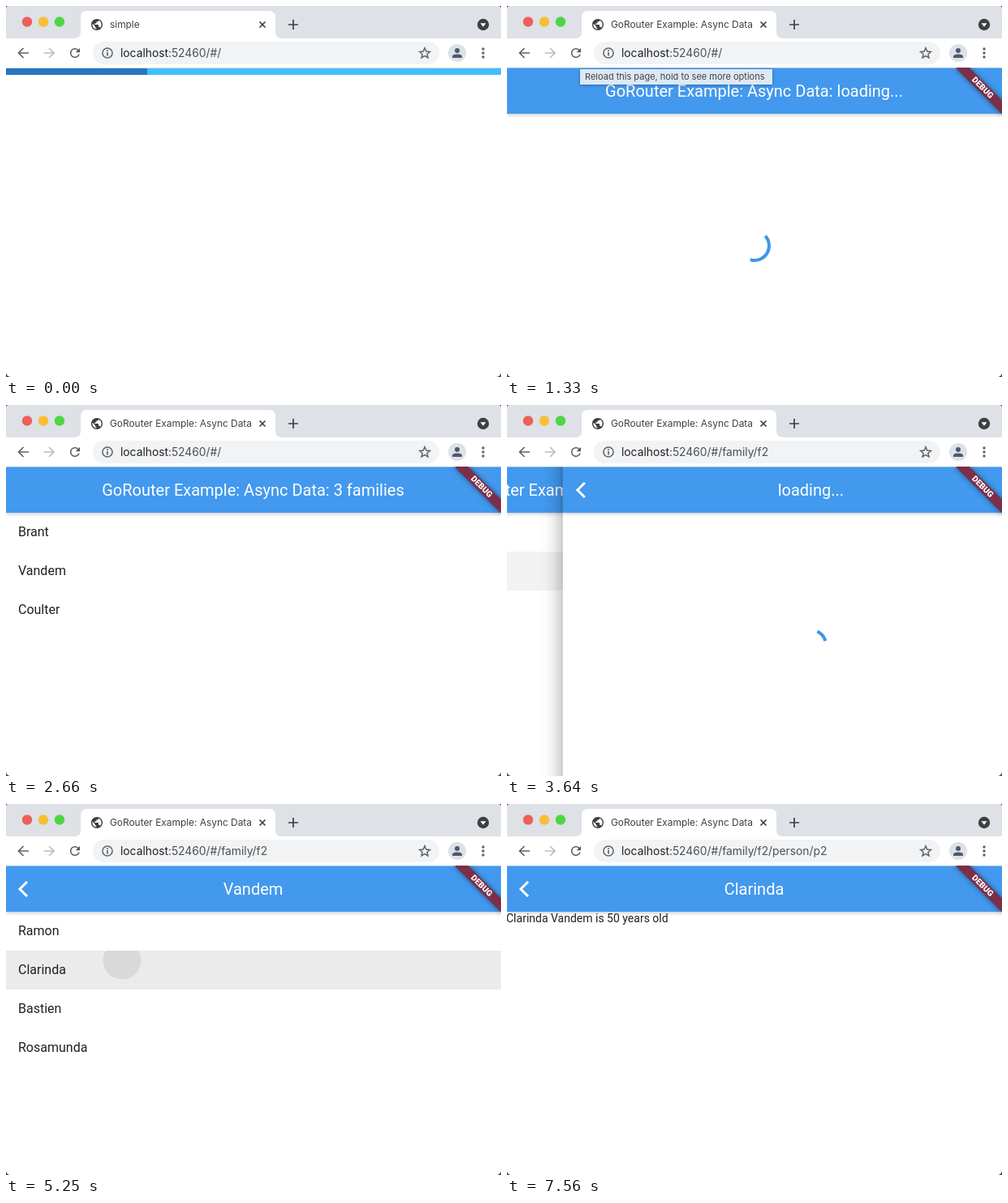
Animation of 610x458 px, one loop 8 s. Source, as an HTML page:

```html
<!DOCTYPE html>
<html lang="en">
<head>
<meta charset="utf-8">
<title>Async data</title>
<style>
  html, body { margin: 0; width: 100%; height: 100%; overflow: hidden; background: #444; }
  #window { position: relative; width: 610px; height: 458px; overflow: hidden; background: #fff; border-radius: 4px 4px 6px 6px; }
  #chrome { position: absolute; left: 0; top: 0; font-family: Inter, "Open Sans", sans-serif; }
  #app { position: absolute; left: 0; top: 76px; width: 610px; height: 382px; overflow: hidden; font-family: Roboto, sans-serif; }
  #loader { position: absolute; left: 0; top: 1px; width: 610px; height: 8px; background: #42bffa; }
  #bar { position: absolute; height: 8px; background: #2676be; }
  .page { position: absolute; left: -1px; top: 0; width: 611px; height: 382px; background: #fff; }
  .edge { position: absolute; left: -30px; top: 0; width: 30px; height: 382px;
    background: linear-gradient(90deg, rgba(0,0,0,0), rgba(0,0,0,.016) 30%, rgba(0,0,0,.07) 60%, rgba(0,0,0,.22)); }
  .header { position: relative; z-index: 1; height: 56px; border-top: 1px solid rgba(66,153,238,.5);
    background: #4299ee padding-box; color: #fff; text-align: center;
    font-size: 20px; line-height: 56px; white-space: nowrap; box-shadow: 0 1px 5px rgba(0,0,0,.26); }
  .back { position: absolute; left: 0; top: 0; }
  .row { position: relative; height: 48px; padding-left: 16px; overflow: hidden; font-size: 16px; line-height: 48px; color: #212121; }
  .row span { position: relative; }
  .ripple { position: absolute; left: 144px; top: 12px; border-radius: 50%; background: #000; transform: translate(-50%, -50%); }
  .note { font-size: 14px; line-height: 16px; color: #212121; }
  .spinner { position: absolute; left: 280.5px; top: 194.5px; }
  #banner { position: absolute; left: 546px; top: 19px; width: 80px; height: 12px; transform: rotate(45deg);
    background: #7c2f48; box-shadow: 0 0 6px rgba(0,0,0,.5); color: #fff; font: 900 10.2px/12px Roboto, sans-serif; text-align: center; }
  #tooltip { position: absolute; left: 90px; top: 78px; width: 237px; height: 19px; box-sizing: border-box; padding-left: 6px;
    background: rgba(246,246,246,.86); box-shadow: 0 0 1px rgba(0,0,0,.45), 0 1px 4px rgba(0,0,0,.25);
    font: 11px/18px Inter, "Open Sans", sans-serif; color: #3f4246; white-space: nowrap; }
</style>
</head>
<body>
<div id="window">
  <svg id="chrome" width="610" height="77" fill="none" stroke-width="1.7">
    <path d="M0 0H610V40H0Z" fill="#dee1e6"/>
    <path d="M84 40Q92 40 92 32V14Q92 6 100 6H324Q332 6 332 14V32Q332 40 340 40Z" fill="#fff"/>
    <path d="M0 76.5H610" stroke="#dadce0" stroke-width="1"/>
    <circle cx="26" cy="19.5" r="6.2" fill="#ed5f5c"/>
    <circle cx="46" cy="19.5" r="6.2" fill="#f6bf35"/>
    <circle cx="66" cy="19.5" r="6.2" fill="#4fd544"/>
    <path transform="translate(103.6 14.6) scale(.7)" fill="#3c4043" d="M12 2C6.48 2 2 6.48 2 12s4.48 10 10 10 10-4.48 10-10S17.52 2 12 2zm-1 17.93c-3.95-.49-7-3.85-7-7.93 0-.62.08-1.21.21-1.79L9 15v1c0 1.1.9 2 2 2zm6.9-2.54c-.26-.81-1-1.39-1.9-1.39h-1v-3c0-.55-.45-1-1-1H8v-2h2c.55 0 1-.45 1-1V7h2c1.1 0 2-.9 2-2v-.41c2.93 1.19 5 4.06 5 7.41 0 2.08-.8 3.97-2.1 5.39z"/>
    <path d="M312.5 19.5L319.5 26.5M319.5 19.5L312.5 26.5M348 23H360M354 17V29" stroke="#3c4043"/>
    <circle cx="588" cy="23" r="7.2" fill="#3c4043"/>
    <path d="M584.5 21.3H591.5L588 25.7Z" fill="#fff"/>
    <path d="M28 58H15.5M21.5 52L15.5 58L21.5 64" stroke="#5f6368"/>
    <path d="M46.5 58H59M53 52L59 58L53 64" stroke="#bcbfc3"/>
    <path transform="translate(76 49) scale(.75)" fill="#54585c" d="M17.65 6.35A8 8 0 0 0 12 4a8 8 0 1 0 7.73 10h-2.08A6 6 0 1 1 12 6c1.66 0 3.14.69 4.22 1.78L13 11h7V4z"/>
    <rect x="107" y="44" width="427" height="28" rx="14" fill="#f1f3f4"/>
    <circle cx="125" cy="58" r="6.1" stroke="#5f6368" stroke-width="1.5"/>
    <path d="M125 57V61.5M125 54.3V55.9" stroke="#5f6368"/>
    <path d="M516 51.8L517.8 56.1L522.4 56.5L518.9 59.5L520 64L516 61.6L512 64L513.1 59.5L509.6 56.5L514.2 56.1Z" stroke="#5f6368" stroke-width="1.5"/>
    <circle cx="556" cy="58" r="11" fill="#dee1e6"/>
    <circle cx="556" cy="55" r="3" fill="#4c5a70"/>
    <path d="M550 64V62.5Q550 59.5 556 59.5T562 62.5V64Z" fill="#4c5a70"/>
    <path d="M588 53V53.01M588 58V58.01M588 63V63.01" stroke="#5f6368" stroke-width="3.4" stroke-linecap="round"/>
    <text id="tabTitle" x="128" y="27" font-size="11.9" fill="#3c4043"></text>
    <text x="141" y="63" font-size="13.8" fill="#202124">localhost<tspan id="path" fill="#4d5054"></tspan></text>
  </svg>
  <div id="app">
    <div id="loader"><div id="bar"></div></div>
    <div id="pages"></div>
    <div id="banner">DEBUG</div>
  </div>
  <div id="tooltip">Reload this page, hold to see more options</div>
</div>
<script>
const LOOP = 8000, STEP = 70, WIDTH = 611;
const APP_START = 1120, TOOLTIP_START = 770, TOOLTIP_FADE = 2030;
const TITLE = 'GoRouter Example: Async Data';
const $ = id => document.getElementById(id);
const clamp = v => Math.min(1, Math.max(0, v));
const show = (el, on) => { el.style.display = on ? '' : 'none'; };

// CSS-style cubic easing, solved by bisection
const bezier = (x1, y1, x2, y2) => x => {
  if (x <= 0 || x >= 1) return clamp(x);
  const at = (s, a, b) => 3 * (1 - s) ** 2 * s * a + 3 * (1 - s) * s * s * b + s ** 3;
  let low = 0, high = 1;
  for (let i = 0; i < 24; i++) {
    const mid = (low + high) / 2;
    if (at(mid, x1, x2) < x) low = mid; else high = mid;
  }
  return at(low, y1, y2);
};
const easeOut = bezier(0, 0, .58, 1);
const fastOutSlowIn = bezier(.4, 0, .2, 1);
const slideEase = bezier(.35, .91, .33, .97);

const rows = names => names.map(name => `<div class="row"><span>${name}</span></div>`).join('');

// slide: page enters; spin: spinner starts; loaded: content arrives; tap: second row is pressed
const pages = [
  { spin: 1095, loaded: 2520, tap: 3430, path: '/#/', waiting: TITLE + ': loading...',
    title: TITLE + ': 3 families', body: rows(['Brant', 'Vandem', 'Coulter']) },
  { slide: 3463, spin: 3505, loaded: 4690, tap: 5250, path: '/#/family/f2', waiting: 'loading...',
    title: 'Vandem', body: rows(['Ramon', 'Clarinda', 'Bastien', 'Rosamunda']) },
  { slide: 5262, spin: 5350, loaded: 6440, path: '/#/family/f2/person/p2', waiting: 'loading...',
    title: 'Clarinda', body: '<div class="note">Clarinda Vandem is 50 years old</div>' }
];

for (const page of pages) {
  const el = page.el = document.createElement('div');
  el.className = 'page';
  el.innerHTML = `<div class="edge"></div><div class="header"><span></span>
    <svg class="back" width="40" height="56"><path d="M27 19L18 28L27 37" fill="none" stroke="#fff" stroke-width="3"/></svg></div>
    <div class="body">${page.body}</div>
    <svg class="spinner" width="50" height="50"><path fill="none" stroke="#3f96e8" stroke-width="4" stroke-linecap="square"/></svg>`;
  const find = selector => el.querySelector(selector);
  page.edge = find('.edge');
  page.heading = find('.header span');
  page.content = find('.body');
  page.spinner = find('.spinner');
  page.arc = find('.spinner path');
  show(find('.back'), page.slide);
  if (page.tap) {
    page.row = el.querySelectorAll('.row')[1];
    page.ripple = document.createElement('div');
    page.ripple.className = 'ripple';
    page.row.prepend(page.ripple);
  }
  $('pages').append(el);
}

function arcPath(elapsed) {
  const phase = elapsed / 1333 % 1;
  const head = fastOutSlowIn(clamp(phase * 2));
  const tail = fastOutSlowIn(clamp(phase * 2 - 1));
  const start = Math.PI * (-.5 + 1.5 * tail + 2 * elapsed / 2222 + .5 * phase);
  const sweep = Math.max(1.5 * Math.PI * (head - tail), .001);
  const point = a => `${25 + 18 * Math.cos(a)} ${25 + 18 * Math.sin(a)}`;
  return `M${point(start)}A18 18 0 ${+(sweep > Math.PI)} 1 ${point(start + sweep)}`;
}

function drawTap(page, t) {
  const age = t - page.tap;
  const active = age >= 0;
  page.row.style.background = active ? `rgba(0,0,0,${Math.max(.04, .08 - age * .00013)})` : '';
  show(page.ripple, active && age < 200);
  page.ripple.style.width = page.ripple.style.height = 47 + age * .5 + 'px';
  page.ripple.style.opacity = .077 * (1 - clamp(age / 200));
}

function drawPage(page, next, t) {
  const entered = page.slide ? slideEase((t - page.slide) / 400) : 1;
  const covered = next ? slideEase((t - next.slide) / 400) : 0;
  const loaded = t >= page.loaded;
  show(page.el, page.slide ? t > page.slide : t >= APP_START);
  page.el.style.transform = `translateX(${WIDTH * (1 - entered - covered / 3)}px)`;
  page.edge.style.opacity = page.slide ? entered : 0;
  page.heading.textContent = loaded ? page.title : page.waiting;
  show(page.content, loaded);
  show(page.spinner, !loaded);
  page.arc.setAttribute('d', arcPath(Math.max(0, t - page.spin)));
  if (page.tap) drawTap(page, t);
}

function render(t) {
  const started = t >= APP_START;
  $('tabTitle').textContent = started ? TITLE : 'simple';
  $('path').textContent = ':52460' + pages.filter(p => !p.slide || t > p.slide).pop().path;

  const progress = easeOut((t + 331) / 2000);
  const left = Math.max(0, -1 + 2 * progress);
  show($('loader'), t < 560);
  $('bar').style.left = left * 610 + 'px';
  $('bar').style.width = (1.1 * progress - left) * 610 + 'px';

  show($('banner'), started);
  pages.forEach((page, i) => drawPage(page, pages[i + 1], t));
  $('tooltip').style.opacity = t < TOOLTIP_START ? 0 : 1 - clamp((t - TOOLTIP_FADE) / 210);
}

const origin = performance.now();
function frame() {
  const t = (performance.now() - origin) % LOOP;
  render(Math.floor(t / STEP) * STEP);
  requestAnimationFrame(frame);
}
frame();
</script>
</body>
</html>
```
